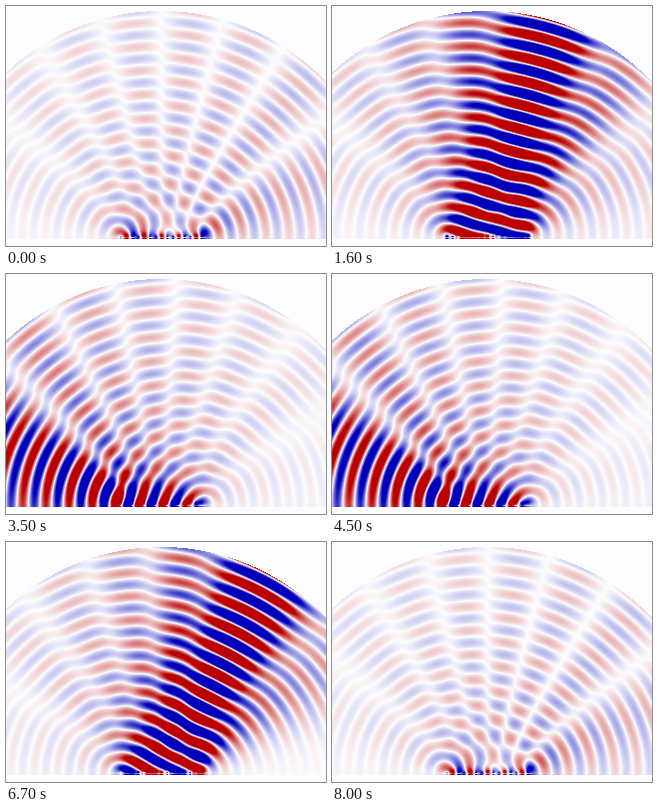
A matplotlib script for the animation above (8100 ms loop, 320 px wide and 240 px high).

```python
import numpy as np
import matplotlib.pyplot as plt
from matplotlib.animation import FuncAnimation
from matplotlib.colors import LinearSegmentedColormap

WIDTH, HEIGHT, DPI = 320, 240, 100
FRAMES, INTERVAL = 81, 100

ELEMENTS = 15
WAVELENGTH = 23.14
SPACING = WAVELENGTH / 4
CENTER_X, ARRAY_Y, RADIUS = 155.5, 231.5, 226.5
FLOOR_Y = 233
MAX_STEP = 120          # largest phase step between neighbours, degrees
CLIP = 0.4              # field strength shown in full colour
BACKGROUND = "#fdfdff"

cmap = LinearSegmentedColormap.from_list(
    "wave", [(0, 0, 0.73), BACKGROUND, (0.73, 0, 0)], N=512)
cmap.set_bad(BACKGROUND)

x, y = np.meshgrid(np.arange(WIDTH) + 0.5, np.arange(HEIGHT) + 0.5)
index = np.arange(ELEMENTS) - ELEMENTS // 2

# Outgoing wave of every element, weaker towards the ground
element_x = (CENTER_X + index * SPACING)[:, None, None]
distance = np.maximum(np.hypot(x - element_x, y - ARRAY_Y), 0.7)
obliquity = ((1 + np.abs(ARRAY_Y - y) / distance) / 2) ** 2
waves = (obliquity * np.exp(-2j * np.pi * distance / WAVELENGTH)
         / np.sqrt(distance))
outside = (np.hypot(x - CENTER_X, y - ARRAY_Y) > RADIUS) | (y > FLOOR_Y)


def field(i):
    half = (FRAMES - 1) / 2
    step = np.radians(MAX_STEP * (2 * abs(i - half) / half - 1))
    total = np.tensordot(np.exp(-1j * index * step), waves, axes=1).real
    return np.ma.array(total, mask=outside)


fig = plt.figure(figsize=(WIDTH / DPI, HEIGHT / DPI), dpi=DPI,
                 facecolor=BACKGROUND)
ax = fig.add_axes([0, 0, 1, 1])
ax.axis("off")
image = ax.imshow(field(0), cmap=cmap, vmin=-CLIP, vmax=CLIP,
                  interpolation="nearest", aspect="auto")


def update(i):
    image.set_data(field(i))
    return (image,)


animation = FuncAnimation(fig, update, frames=FRAMES, interval=INTERVAL,
                          repeat=True, repeat_delay=0)
plt.show()
```
